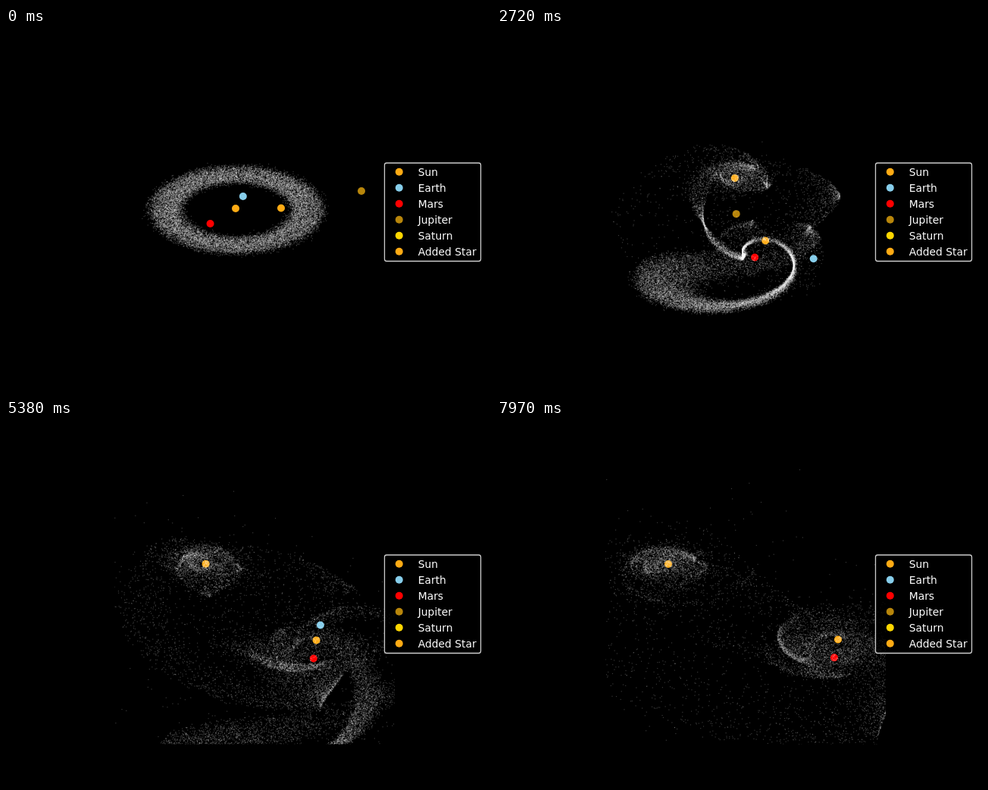
Write an HTML page with a canvas that moves like this. It is 640 by 480 pixels and loops after 8000 ms.

```html
<!DOCTYPE html>
<html lang="en">
<head>
<meta charset="utf-8">
<title>Stellar flyby</title>
<style>
  html, body { margin: 0; width: 100%; height: 100%; overflow: hidden; background: #000; }
  canvas, svg { position: absolute; left: 0; top: 0; width: 640px; height: 480px; }
  text { font: 13.89px "DejaVu Sans", sans-serif; fill: #fff; }
</style>
</head>
<body>
<canvas id="sky" width="640" height="480"></canvas>
<svg id="legend" viewBox="0 0 640 480">
  <rect x="499.5" y="178" width="127" height="129.5" rx="2.8" fill="#000" fill-opacity=".8" stroke="#ccc" stroke-width="1.3"/>
</svg>
<script>
const LOOP = 8000, STEP = 70, STEPS = Math.floor((LOOP + 10) / STEP) + 1;
const COUNT = 19000, SUBSTEPS = 4;
const MASS = 235000;      // gravitational parameter of each star, px^3/s^2
const SOFT = 20;          // softening, px^2
const TILT = .5;          // vertical foreshortening of the orbital plane
const COLORS = { Sun: '#ffab14', Earth: '#87ceeb', Mars: '#ff0000', Jupiter: '#b8860b', Saturn: '#ffd700', 'Added Star': '#ffab14' };
const ctx = document.getElementById('sky').getContext('2d');
const rad = deg => deg * Math.PI / 180;

let seed = 20117;
function random() {
  seed = seed + 0x6D2B79F5 | 0;
  let v = Math.imul(seed ^ seed >>> 15, 1 | seed);
  v = v + Math.imul(v ^ v >>> 7, 61 | v) ^ v;
  return ((v ^ v >>> 14) >>> 0) / 4294967296;
}
const gauss = () => (random() + random() + random() + random() - 2) * 1.73;

// Hermite curve through [ms, a, b] keys; start is the initial rate per second.
function track(start, ...keys) {
  const slope = (i, c) => {
    if (i === 0 && start) return start[c - 1] / 1000;
    const p = keys[Math.max(0, i - 1)], q = keys[Math.min(keys.length - 1, i + 1)];
    return (q[c] - p[c]) / (q[0] - p[0]);
  };
  return t => {
    let i = 0;
    while (i < keys.length - 2 && t >= keys[i + 1][0]) i++;
    const p = keys[i], q = keys[i + 1], h = q[0] - p[0], s = Math.min(1, (t - p[0]) / h);
    return [1, 2].map(c => p[c] + (q[c] - p[c]) * s * s * (3 - 2 * s)
      + h * s * (1 - s) * ((1 - s) * slope(i, c) - s * slope(i + 1, c)));
  };
}

const SUN_SPEED = [-11, 28];
const sun = track(SUN_SPEED, [0, 303, 238], [420, 303.5, 249], [840, 309.5, 257], [1680, 329, 270],
  [2720, 354, 280.5], [3700, 375.5, 286], [4540, 393.5, 289], [6220, 424, 291], [7970, 450, 289.5]);
const star = track([11, -28], [0, 363, 237.5], [420, 362.5, 227], [840, 356.5, 219], [1680, 337, 207],
  [2720, 314, 198], [3700, 294.5, 194], [4540, 278, 191], [6220, 250.5, 189], [7970, 226, 190]);
const jupiter = track([-25, 11], [0, 469, 215], [1680, 402.5, 233], [2720, 316.5, 245], [3700, 241, 258.5],
  [4540, 184, 268.5], [5400, 126, 278], [8000, -40, 300]);

// Orbits around the sun: angle in degrees and radius.
const earthOrbit = track(null, [0, -73, 33.5], [840, -199, 35], [1680, -280, 57], [2720, -323, 79], [3700, -347, 82],
  [4540, -372, 69], [5100, -405, 55], [5550, -470, 33], [5900, -555, 28], [6220, -619, 35], [7970, -690, 82]);
const marsOrbit = track(null, [0, 130, 52], [840, 85, 50], [1680, 0, 24], [2020, -96, 18], [2720, -251, 46],
  [3700, -305, 49], [4540, -456, 18], [5240, -611, 46], [6220, -665, 49], [7060, -816, 18], [7760, -971, 46], [7970, -984, 48]);

function orbit(path, t) {
  const [x, y] = sun(t), [angle, r] = path(t);
  return [x + r * Math.cos(rad(angle)), y + r * Math.sin(rad(angle)) * TILT];
}

// A ring of massless dust on circular orbits, integrated in the field of both stars.
function simulateDust() {
  const dt = STEP / SUBSTEPS / 1000;
  const frames = Array.from({ length: STEPS }, () => new Float32Array(COUNT * 2));
  const fields = Array.from({ length: STEPS * SUBSTEPS }, (_, i) => {
    const t = (i + .5) * dt * 1000, [sx, sy] = sun(t), [ax, ay] = star(t);
    return { sx, sy: sy / TILT, ax, ay: ay / TILT };
  });
  for (let n = 0; n < COUNT; n++) {
    const a = random() * 2 * Math.PI;
    const r = 94 + 24 * ((random() * 2 - 1) * .8 + gauss() * .2);
    const v = Math.sqrt(MASS / r), lift = gauss() * 1.5;
    let x = 304 + r * Math.cos(a), y = 240 / TILT + r * Math.sin(a);
    let vx = SUN_SPEED[0] + v * Math.sin(a), vy = SUN_SPEED[1] / TILT - v * Math.cos(a);
    for (let k = 0; k < STEPS; k++) {
      frames[k][2 * n] = x;
      frames[k][2 * n + 1] = y * TILT + lift;
      for (let j = 0; j < SUBSTEPS; j++) {
        const f = fields[k * SUBSTEPS + j];
        x += vx * dt / 2;
        y += vy * dt / 2;
        const px = f.sx - x, py = f.sy - y, qx = f.ax - x, qy = f.ay - y;
        const p2 = px * px + py * py + SOFT, q2 = qx * qx + qy * qy + SOFT;
        const p = MASS * dt / (p2 * Math.sqrt(p2)), q = MASS * dt / (q2 * Math.sqrt(q2));
        vx += px * p + qx * q;
        vy += py * p + qy * q;
        x += vx * dt / 2;
        y += vy * dt / 2;
      }
    }
  }
  return frames;
}

function drawDust(points) {
  ctx.fillStyle = 'rgba(255,255,255,.23)';
  for (let i = 0; i < points.length; i += 2) ctx.fillRect(points[i] - .57, points[i + 1] - .57, 1.15, 1.15);
}

function drawBody([x, y], name) {
  ctx.fillStyle = COLORS[name];
  ctx.beginPath();
  ctx.arc(x, y, 5, 0, 2 * Math.PI);
  ctx.fill();
}

const dust = simulateDust();

function draw(step) {
  const t = step * STEP;
  ctx.fillStyle = '#000';
  ctx.fillRect(0, 0, 640, 480);
  ctx.save();
  ctx.beginPath();
  ctx.rect(143, 58, 370, 369.5);
  ctx.clip();
  drawBody(jupiter(t), 'Jupiter');
  drawBody(orbit(earthOrbit, t), 'Earth');
  drawBody(orbit(marsOrbit, t), 'Mars');
  drawBody(sun(t), 'Sun');
  drawBody(star(t), 'Added Star');
  drawDust(dust[step]);
  ctx.restore();
}

Object.entries(COLORS).forEach(([name, color], i) => {
  const y = 189.7 + 21 * i;
  document.getElementById('legend').insertAdjacentHTML('beforeend',
    `<circle cx="518.8" cy="${y}" r="5" fill="${color}"/><text x="543.7" y="${y + 4.8}">${name}</text>`);
});

const begin = performance.now();
let drawn = -1;
function tick() {
  const step = Math.floor(((performance.now() - begin) % LOOP + 10) / STEP);
  if (step !== drawn) draw(drawn = step);
  requestAnimationFrame(tick);
}
tick();
</script>
</body>
</html>
```
